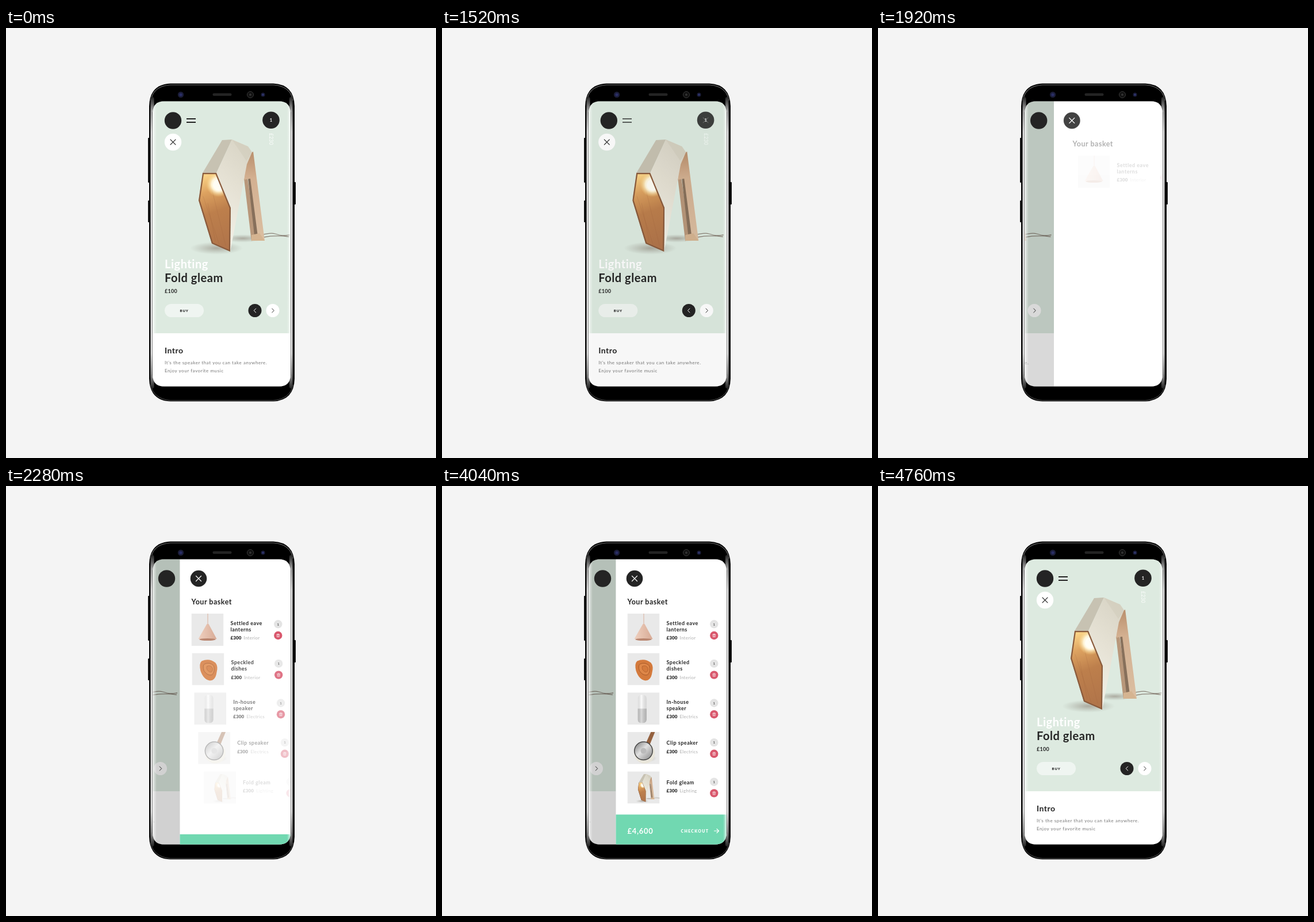
Recreate the animation shown at these times as an HTML page. Size 748 px wide and 748 px high, loop 4.8 s.

```html
<!DOCTYPE html>
<html lang="en">
<head>
<meta charset="utf-8">
<title>Shop basket</title>
<style>
html, body { margin: 0; width: 100%; height: 100%; overflow: hidden; background: #f4f4f4; }
svg { display: block; width: 748px; height: 748px; font-family: Lato, "Open Sans", sans-serif; fill: #242424; }
.b { font-weight: 700; }
.h { font-weight: 900; }
.line { fill: none; stroke-linecap: round; stroke-linejoin: round; }
.big { font-size: 20px; letter-spacing: .55px; }
.intro { font-size: 14px; letter-spacing: .5px; }
.body { font-size: 8px; letter-spacing: .57px; fill: #777; }
.title { font-size: 12.5px; letter-spacing: .5px; }
.name { font-size: 9px; letter-spacing: .5px; }
.cost { font-size: 8px; letter-spacing: .1px; }
.kind { font-size: 8px; letter-spacing: .25px; fill: #b0b0b0; }
</style>
</head>
<body>
<svg viewBox="0 0 748 748">
  <defs>
    <clipPath id="screen"><path d="M255 147Q256 127.500 275 127.500H475Q494 127.500 495 147V604Q494 623.500 475 623.500H275Q256 623.500 255 604Z"/></clipPath>
    <clipPath id="mouth"><path d="M342 252H366L391 313 390 389 358 375 335 300Z"/></clipPath>
    <clipPath id="thumb"><rect width="56" height="56"/></clipPath>
    <linearGradient id="wood" x1=".4" y1="0" x2=".55" y2="1">
      <stop offset="0" stop-color="#fbd487"/><stop offset=".22" stop-color="#dda260"/>
      <stop offset=".5" stop-color="#bd7f4c"/><stop offset="1" stop-color="#b0744a"/>
    </linearGradient>
    <linearGradient id="cream" x1=".6" y1="0" x2=".3" y2="1">
      <stop offset="0" stop-color="#d9d5c6"/><stop offset=".45" stop-color="#e6e2d5"/><stop offset="1" stop-color="#f3f3ea"/>
    </linearGradient>
    <linearGradient id="leg" x1="0" y1="0" x2="0" y2="1">
      <stop offset="0" stop-color="#b98f6c"/><stop offset=".3" stop-color="#d3b091"/><stop offset="1" stop-color="#dbbfa2"/>
    </linearGradient>
    <radialGradient id="bulb"><stop offset="0" stop-color="#fff"/><stop offset=".55" stop-color="#fff6dc"/><stop offset="1" stop-color="#ffdc8a" stop-opacity="0"/></radialGradient>
    <radialGradient id="shade"><stop offset="0" stop-color="#84786c" stop-opacity=".55"/><stop offset="1" stop-color="#8a8a80" stop-opacity="0"/></radialGradient>
    <linearGradient id="cone"><stop offset="0" stop-color="#efd0bf"/><stop offset="1" stop-color="#d8ab96"/></linearGradient>
    <linearGradient id="steel" x1="0" y1="0" x2="1" y2="1"><stop offset="0" stop-color="#777"/><stop offset=".45" stop-color="#e2e2e2"/><stop offset="1" stop-color="#868686"/></linearGradient>
    <linearGradient id="tube"><stop offset="0" stop-color="#000" stop-opacity=".1"/><stop offset=".4" stop-color="#fff" stop-opacity=".25"/><stop offset="1" stop-color="#000" stop-opacity=".14"/></linearGradient>
    <linearGradient id="gloss"><stop offset="0" stop-color="#fff" stop-opacity=".75"/><stop offset="1" stop-color="#fff" stop-opacity="0"/></linearGradient>
    <linearGradient id="rim" x1="0" y1="0" x2="0" y2="1">
      <stop offset="0" stop-color="#222"/><stop offset=".05" stop-color="#a9a9a9"/><stop offset=".12" stop-color="#e4e4e4"/>
      <stop offset=".88" stop-color="#e4e4e4"/><stop offset=".95" stop-color="#999"/><stop offset="1" stop-color="#222"/>
    </linearGradient>
    <g id="lamp">
      <ellipse cx="366" cy="383" rx="46" ry="11" fill="url(#shade)"/>
      <ellipse cx="412" cy="366" rx="36" ry="7" fill="url(#shade)"/>
      <path d="M427 357C448 364 455 354 468 358S484 361 493 360M448 364Q468 360 492 363" class="line" stroke="#8b8378" stroke-width="1.300"/>
      <path d="M414 262L420 260 434 357 427 371Z" fill="#b8977a"/>
      <path d="M421 262L427 260 440 360 432 360Z" fill="#87705b"/>
      <path d="M418 222L430 215 450 370 439 370 425 262 414 264Z" fill="url(#leg)"/>
      <path d="M427 360L441 357 450 370 427 370Z" fill="#d5b491"/>
      <path d="M376 195L393 194 366 252H342Z" fill="#c7c2b2"/>
      <path d="M393 194L421 206 428 216 419 237 390 389 391 313 366 252Z" fill="url(#cream)"/>
      <path d="M393 194L421 206 428 216 418 231Z" fill="#d2cdbc" opacity=".55"/>
      <g clip-path="url(#mouth)">
        <path d="M342 252H366L391 313 390 389 358 375 335 300Z" fill="url(#wood)"/>
        <path d="M343 293L371 377M358 280L382 378M351 305L364 370" class="line" stroke="#955d38" opacity=".2"/>
        <circle cx="370" cy="272" r="22" fill="url(#bulb)"/>
        <circle cx="370" cy="273" r="10" fill="#fffdf4"/>
        <path d="M342 252H366L391 313 390 389 358 375 335 300Z" class="line" stroke="#8a5b3d" stroke-width="4.500"/>
      </g>
    </g>
    <g id="cross"><path d="M-4.500-4.500L4.500 4.500M4.500-4.500L-4.500 4.500" class="line"/></g>
  </defs>

  <rect width="748" height="748" fill="#f4f4f4"/>
  <g fill="#111">
    <rect x="247" y="191" width="4" height="78" rx="1"/>
    <rect x="247" y="300" width="4" height="38" rx="1"/>
    <rect x="500" y="268" width="4" height="39" rx="1"/>
  </g>
  <path d="M249 136Q250 98 286 96.500H465Q501 98 502 136V610Q501 648 465 649.500H286Q250 648 249 610Z" fill="#000"/>
  <path d="M252 126Q256 101 286 99H465Q495 101 499 126" class="line" stroke="#686868" stroke-width="1.200"/>
  <path d="M252 621Q256 645 286 648H465Q495 645 499 621" class="line" stroke="#555"/>
  <rect x="251.500" y="120" width="6" height="507" rx="3" fill="url(#rim)"/>
  <rect x="493" y="120" width="5.500" height="507" rx="3" fill="url(#rim)"/>
  <path d="M255 147Q256 127.500 275 127.500H475Q494 127.500 495 147V604Q494 623.500 475 623.500H275Q256 623.500 255 604Z" stroke="#000" stroke-width=".8" fill="#fff"/>
  <rect x="359.500" y="113.500" width="33" height="4.500" rx="2" fill="#242424"/>
  <circle cx="304" cy="116" r="5.200" fill="#1b1d38"/><circle cx="304" cy="116" r="2.600" fill="#2a2e66"/>
  <circle cx="425" cy="116" r="5.500" fill="#111" stroke="#383838"/><circle cx="425" cy="116" r="2" fill="#333"/>
  <circle cx="447" cy="116" r="3.500" fill="#1b1e3c"/><circle cx="447" cy="116" r="1.500" fill="#343b7a"/>

  <g clip-path="url(#screen)">
    <g id="page">
      <rect x="255" y="127" width="243" height="404" fill="#ddeae0"/>
      <rect x="255" y="531" width="243" height="94" fill="#fff"/>
      <use href="#lamp"/>
      <circle cx="290.500" cy="198.500" r="14.700" fill="#fff"/>
      <use href="#cross" x="290.500" y="198.500" stroke="#333" stroke-width="1.100"/>
      <text class="b big" x="276" y="418" fill="#fff">Lighting</text>
      <text class="b big" x="276" y="442">Fold gleam</text>
      <text class="b" x="276" y="460.500" font-size="9" letter-spacing=".3">£100</text>
      <rect x="276" y="480" width="68" height="23" rx="11.500" fill="#fff" opacity=".55"/>
      <text class="h" x="302.500" y="494" font-size="6" letter-spacing=".9">BUY</text>
      <circle cx="433" cy="491.500" r="11.500"/>
      <circle cx="464" cy="491.500" r="11.500" fill="#fff"/>
      <path d="M434.700 488L431.200 491.500 434.700 495" class="line" stroke="#fff"/>
      <path d="M462.700 488L466.200 491.500 462.700 495" class="line" stroke="#333"/>
      <text class="b intro" x="276" y="566">Intro</text>
      <text class="body" x="276" y="585">It's the speaker that you can take anywhere.</text>
      <text class="body" x="276" y="599">Enjoy your favorite music</text>
    </g>
    <rect id="dim" x="255" y="127" width="243" height="498" fill="#000"/>
    <g id="drawer">
      <rect x="302.500" y="127" width="200" height="498" fill="#fff"/>
      <text id="title" class="b title" x="322.500" y="205.500">Your basket</text>
      <g id="list"></g>
      <g id="total">
        <rect x="302.500" y="571.500" width="200" height="60" fill="#71d8b1"/>
        <g fill="#fff">
          <text class="b" x="322.500" y="605" font-size="13" letter-spacing=".7">£4,600</text>
          <text class="h" x="415.500" y="603" font-size="7" letter-spacing="1.300">CHECKOUT</text>
        </g>
        <path d="M473.500 600H481.500M478 596.500L481.500 600 478 603.500" class="line" stroke="#fff" stroke-width="1.100"/>
      </g>
    </g>
    <circle id="logo" cx="290.500" cy="161" r="14.700"/>
    <path id="menu" d="M314 158H330M314 164H330" class="line" stroke="#242424" stroke-width="2" style="stroke-linecap:butt"/>
    <text id="sum" font-size="8.500" letter-spacing=".2" fill="#fff">£230</text>
    <g id="cart">
      <g id="count"><circle r="14.800"/><text class="b" y="2.700" font-size="7.500" text-anchor="middle" fill="#fff">1</text></g>
      <g id="shut"><circle r="14.300"/><use href="#cross" stroke="#fff" stroke-width="1.200"/></g>
    </g>
    <rect x="255" y="127" width="7" height="498" fill="url(#gloss)"/>
    <rect x="-495" y="127" width="6" height="498" fill="url(#gloss)" transform="scale(-1 1)"/>
  </g>
</svg>
<script>
const LOOP = 4800, SLIDE = 195.5;
const OPEN = [1420, 600], CLOSE = [4040, 480];
const $ = id => document.getElementById(id);

const art = [
  `<path d="M28.500 0V20" stroke="#d9b09c"/><path d="M27 18H30L44 44Q28 50 12 44Z" fill="url(#cone)"/><ellipse cx="28" cy="45" rx="14" ry="2" fill="#b98670"/>`,
  `<path d="M17 14Q30 8 41 17 46 23 43 34 41 48 31 48 20 46 15 31 12 18 17 14Z" fill="#d47a3c"/>
   <path d="M22 19Q31 15 38 22 41 32 35 38 27 40 21 31 18 22 22 19Z" fill="#de8748" stroke="#a95a29"/>
   <path d="M26 23Q33 20 36 27 36 34 31 33 24 29 26 23Z" fill="#d47a3c" stroke="#a95a29" stroke-width=".7"/>`,
  `<rect x="18" y="4" width="15.500" height="49" rx="6" fill="#fafafa"/><path d="M18 28H33.500V47Q33 53 27 53H24Q18 53 18 47Z" fill="#d0d0d0"/><rect x="18" y="4" width="15.500" height="49" rx="6" fill="url(#tube)"/>`,
  `<ellipse cx="32" cy="46" rx="19" ry="7" fill="url(#shade)"/><path d="M32 20L41 0H48L39 22Z" fill="#94613f"/>
   <circle cx="30" cy="37" r="18" fill="#e8e5da"/><circle cx="28" cy="33" r="16.500" fill="#444"/><circle cx="28" cy="33" r="15" fill="url(#steel)"/><circle cx="28" cy="33" r="5" fill="#bbb"/>`,
  `<use href="#lamp" transform="translate(-65.500 -44) scale(.25)"/>`
];
const goods = [
  [["Settled eave", "lanterns"], "Interior"],
  [["Speckled", "dishes"], "Interior"],
  [["In-house", "speaker"], "Electrics"],
  [["Clip speaker"], "Electrics"],
  [["Fold gleam"], "Lighting"]
];

$("list").innerHTML = goods.map(([name, kind], i) => {
  const top = name.length > 1 ? 19.5 : 22.5;
  const cost = name.length > 1 ? 45 : 37;
  return `<g><g transform="translate(322.500 ${222 + i * 68.6})">
    <g clip-path="url(#thumb)"><rect width="56" height="56" fill="#e9e9e9"/>${art[i]}</g>
    ${name.map((s, n) => `<text class="b name" x="68" y="${top + n * 11}">${s}</text>`).join("")}
    <text class="h cost" x="68" y="${cost}">£300</text><text class="kind" x="91" y="${cost}">${kind}</text>
    <circle cx="150.800" cy="18.300" r="7.200" fill="#e4e4e4"/>
    <text x="150.800" y="20.600" font-size="6" text-anchor="middle">1</text>
    <circle cx="150.800" cy="38" r="7.200" fill="#d9586d"/>
    <path d="M148.300 36.500H153.300M149.800 35.500H151.800M148.900 37V40.500H152.700V37M150.800 37.500V39.500" class="line" stroke="#fff" stroke-width=".7"/>
  </g></g>`;
}).join("");
const rows = [...$("list").children];

const ramp = (t, start, span) => Math.min(1, Math.max(0, (t - start) / span));
const inOut = u => u < .5 ? 4 * u ** 3 : 1 - 4 * (1 - u) ** 3;
const move = (el, x, y = 0) => el.setAttribute("transform", `translate(${x} ${y})`);
const fade = (el, a) => el.setAttribute("opacity", a);

function enter(el, t, start, gone) {
  const u = ramp(t, start, 400);
  move(el, 30 * (1 - u) ** 2);
  fade(el, u * (1 - gone));
}

function draw(t) {
  const closing = t >= CLOSE[0];
  const u = closing ? 1 - ramp(t, ...CLOSE) : ramp(t, ...OPEN);
  const p = inOut(u);
  const gone = ramp(t, CLOSE[0], 300);
  const menu = closing ? ramp(t, 4240, 240) : 1 - ramp(t, OPEN[0], 330);

  move($("page"), -SLIDE * p);
  move($("drawer"), SLIDE * (1 - p));
  fade($("dim"), .18 * u);
  move($("logo"), -11 * p);
  fade($("menu"), menu);

  const x = 461 - 126 * p;
  move($("cart"), x, 160.3 + .7 * p);
  fade($("count"), 1 - u);
  fade($("shut"), u);
  $("sum").setAttribute("transform", `translate(${x - 2.7} 183) rotate(90)`);
  fade($("sum"), menu * .9);

  enter($("title"), t, 1780, gone);
  rows.forEach((row, i) => enter(row, t, 1860 + 90 * i, gone));
  move($("total"), 0, 54 * (1 - ramp(t, 2200, 400)) ** 2);
}

const begin = performance.now();
function tick() {
  draw((performance.now() - begin) % LOOP);
  requestAnimationFrame(tick);
}
tick();
</script>
</body>
</html>
```
